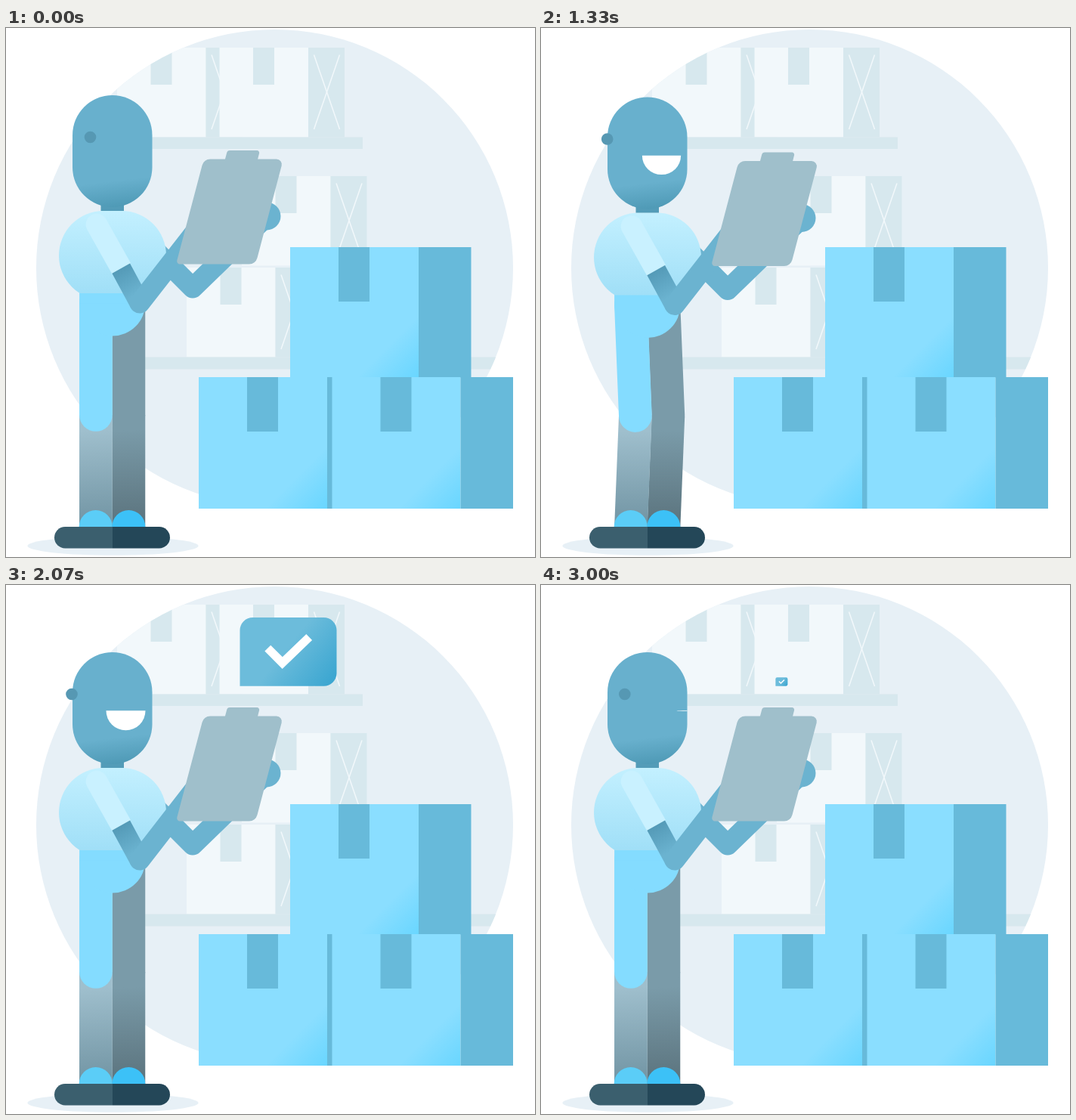
An HTML page with a canvas that plays this animation: 700x700 px, repeating every 3.03 s.

```html
<!DOCTYPE html>
<html lang="en">
<head>
<meta charset="utf-8">
<title>Warehouse check</title>
<style>
  html, body { margin: 0; width: 100%; height: 100%; overflow: hidden; background: #fff; }
  canvas { display: block; width: 700px; height: 700px; }
</style>
</head>
<body>
<canvas id="stage" width="700" height="700"></canvas>
<script>
const ctx = document.getElementById('stage').getContext('2d');
const LOOP = 3030;
const FRAME = 100 / 3;
const SKIN = '#6bb3d0', PANTS = '#84dcff', GREY = '#7a9ba9';
const PALE = '#e7f0f6', FRONT = '#f2f8fb', SHADE = '#d7e8ee';

// Smooth 0..1 between two moments counted in steps of 1/30 s
function ease(step, from, to) {
  const p = Math.min(1, Math.max(0, (step - from) / (to - from)));
  return p * p * (3 - 2 * p);
}

const pulse = (step, a, b, c, d) => ease(step, a, b) - ease(step, c, d);

function gradient(x0, y0, x1, y1, from, to) {
  const g = ctx.createLinearGradient(x0, y0, x1, y1);
  g.addColorStop(0, from);
  g.addColorStop(1, to);
  return g;
}

function box(x0, y0, x1, y1, fill) {
  ctx.fillStyle = fill;
  ctx.fillRect(x0, y0, x1 - x0, y1 - y0);
}

function rounded(x0, y0, x1, y1, radii, fill) {
  ctx.beginPath();
  ctx.roundRect(x0, y0, x1 - x0, y1 - y0, radii);
  ctx.fillStyle = fill;
  ctx.fill();
}

function oval(x, y, rx, ry, fill, start = 0, end = Math.PI * 2) {
  ctx.beginPath();
  ctx.ellipse(x, y, rx, ry, 0, start, end);
  ctx.fillStyle = fill;
  ctx.fill();
}

function line(points, width, color, cap = 'butt', join = 'round') {
  ctx.beginPath();
  points.forEach(([x, y]) => ctx.lineTo(x, y));
  ctx.lineWidth = width;
  ctx.strokeStyle = color;
  ctx.lineCap = cap;
  ctx.lineJoin = join;
  ctx.stroke();
}

// Polygon of [x, y, cornerRadius]
function softPolygon(points, fill) {
  const [last, first] = [points[points.length - 1], points[0]];
  ctx.beginPath();
  ctx.moveTo((last[0] + first[0]) / 2, (last[1] + first[1]) / 2);
  points.forEach(([x, y, r], i) => {
    const next = points[(i + 1) % points.length];
    ctx.arcTo(x, y, next[0], next[1], r);
  });
  ctx.closePath();
  ctx.fillStyle = fill;
  ctx.fill();
}

function paleBox(x, y) {
  box(x, y, x + 117.5, y + 118.5, FRONT);
  box(x + 117.5, y, x + 165.5, y + 118.5, SHADE);
  box(x + 44.5, y, x + 72.5, y + 49, SHADE);
  const l = x + 125, r = x + 159, t = y + 9.5, b = y + 108;
  line([[l, t], [r, b]], 1.5, FRONT);
  line([[r, t], [l, b]], 1.5, FRONT);
}

function crate(x, y, height) {
  const right = x + 170, bottom = y + height;
  box(x, y, right, bottom, gradient(right - 41, bottom - 41, right, bottom, '#8adeff', '#69d6ff'));
  box(right, y, right + 69.5, bottom, '#67bada');
  box(x + 64, y, x + 105, y + 72, '#67bada');
}

function drawRoom() {
  ctx.save();
  oval(355.5, 317.5, 315.5, 315.5, PALE);
  ctx.clip();
  paleBox(147, 26);
  paleBox(282.5, 26);
  box(100, 144.5, 472, 160, SHADE);
  paleBox(312, 196);
  paleBox(239, 317);
  box(150, 435.5, 660, 451.5, SHADE);
  ctx.restore();
  crate(376, 290, 172.5);
  crate(255, 462, 174);
  crate(431.5, 462, 174);
  oval(141.5, 685.3, 113, 12.5, PALE);
}

function drawLeg(x, squat, thigh, calfTop, calfEnd) {
  const hip = [x, 364 + 24 * squat];
  const knee = [x + 57.5 * squat, 512 + 10 * squat];
  const foot = [x, 662];
  const startX = knee[0] + (foot[0] - knee[0]) * 0.15;
  line([knee, foot], 43.7, gradient(startX, knee[1] + 20, foot[0] + 6, foot[1], calfTop, calfEnd));
  line([hip, knee], 43.7, thigh, 'round');
}

function drawFeet() {
  oval(118.7, 660, 22, 22, '#5bcdf7', Math.PI);
  oval(162.3, 660, 22, 22, '#3cc1f7', Math.PI);
  rounded(64, 660, 141, 688.5, [14.2, 0, 0, 14.2], '#3b5f6e');
  rounded(141, 660, 217, 688.5, [0, 14.2, 14.2, 0], '#244758');
}

function drawBackArm() {
  line([[190, 287], [247, 344], [345, 249]], 27, SKIN);
  oval(345, 249, 18.5, 18.5, SKIN);
}

function drawTorso() {
  oval(140.75, 364, 43.6, 43.6, PANTS, 0, Math.PI);
  box(97.1, 350, 184.3, 364.5, PANTS);
  ctx.save();
  ctx.beginPath();
  ctx.rect(60, 230, 170, 121);
  ctx.clip();
  rounded(70, 242, 212, 360, 59, gradient(141, 242, 141, 351, '#c3f0ff', '#a0dff7'));
  ctx.restore();
}

function drawFrontArm(tap) {
  const elbow = [177, 364];
  line([[150, 314], elbow], 27, gradient(153, 319, 172, 353, '#559bb8', SKIN), 'butt');
  ctx.save();
  ctx.translate(...elbow);
  ctx.rotate(-0.086 * tap);
  line([[0, 0], [85, -109]], 27, SKIN, 'round');
  oval(85, -109, 18.5, 18.5, SKIN);
  ctx.restore();
  ctx.save();
  ctx.beginPath();
  ctx.moveTo(90, 230);
  ctx.lineTo(90, 353);
  ctx.lineTo(204, 289);
  ctx.lineTo(204, 230);
  ctx.clip();
  line([[120, 260], [152.5, 318]], 28.6, '#c9f1ff', 'round');
  ctx.restore();
}

function drawClipboard() {
  const color = '#9fbfcb';
  softPolygon([[293, 162, 4], [336, 162, 3], [332.5, 176, 0], [289.3, 176, 0]], color);
  softPolygon([[261.7, 173.5, 11], [367, 173.5, 7], [330.3, 312.5, 11], [225, 312.5, 4]], color);
}

function drawHead(smile) {
  box(125.5, 225, 156, 242, '#539cb8');
  ctx.save();
  rounded(88, 89, 193.5, 237, 52.7, gradient(138, 203, 142, 237, '#68b0cd', '#4f9ab6'));
  ctx.clip();
  if (smile > 0) {
    oval(158.5 + 35.5 * (1 - smile), 166.3, 13 + 13 * smile, 26 * smile, '#fff', 0, Math.PI);
  }
  ctx.restore();
  oval(111.5 - 24.5 * smile, 144.5, 7.8, 7.8, '#5698b3');
}

function drawBubble(size, tick) {
  ctx.save();
  ctx.translate(310.5, 133.7);
  ctx.scale(size, size);
  ctx.translate(-310.5, -133.7);
  rounded(309.5, 43, 437.5, 133.7, [17, 17, 17, 0], gradient(372, 83, 428, 128, '#6cbcdb', '#3da7d1'));
  if (tick > 0) {
    ctx.translate(373.5, 88);
    ctx.scale(tick, tick);
    line([[-28, -4.5], [-8, 15.5], [28.5, -19.5]], 11.5, '#fff', 'butt', 'miter');
  }
  ctx.restore();
}

function draw(time) {
  const step = Math.floor((time % LOOP + 5) / FRAME);
  const squat = pulse(step, 31, 36, 36, 41);
  const smile = pulse(step, 31, 41, 81, 91);
  const tap = pulse(step, 42, 52, 53, 63) + pulse(step, 78, 83, 83, 88);
  const pop = pulse(step, 45, 55, 81, 91);

  ctx.fillStyle = '#fff';
  ctx.fillRect(0, 0, 700, 700);
  drawRoom();

  ctx.save();
  ctx.translate(0, 24 * squat);
  drawBackArm();
  ctx.restore();

  drawLeg(162.4, squat, GREY, GREY, '#5a727c');
  drawLeg(118.9, squat, PANTS, '#9fbfcd', '#7093a2');
  drawFeet();

  ctx.save();
  ctx.translate(0, 24 * squat);
  drawTorso();
  drawHead(smile);
  drawFrontArm(tap);
  drawClipboard();
  ctx.restore();

  if (pop > 0) drawBubble(0.1 + 0.9 * pop, ease(step, 53, 63));
}

const start = performance.now();
function tick() {
  draw(performance.now() - start);
  requestAnimationFrame(tick);
}
tick();
</script>
</body>
</html>
```
